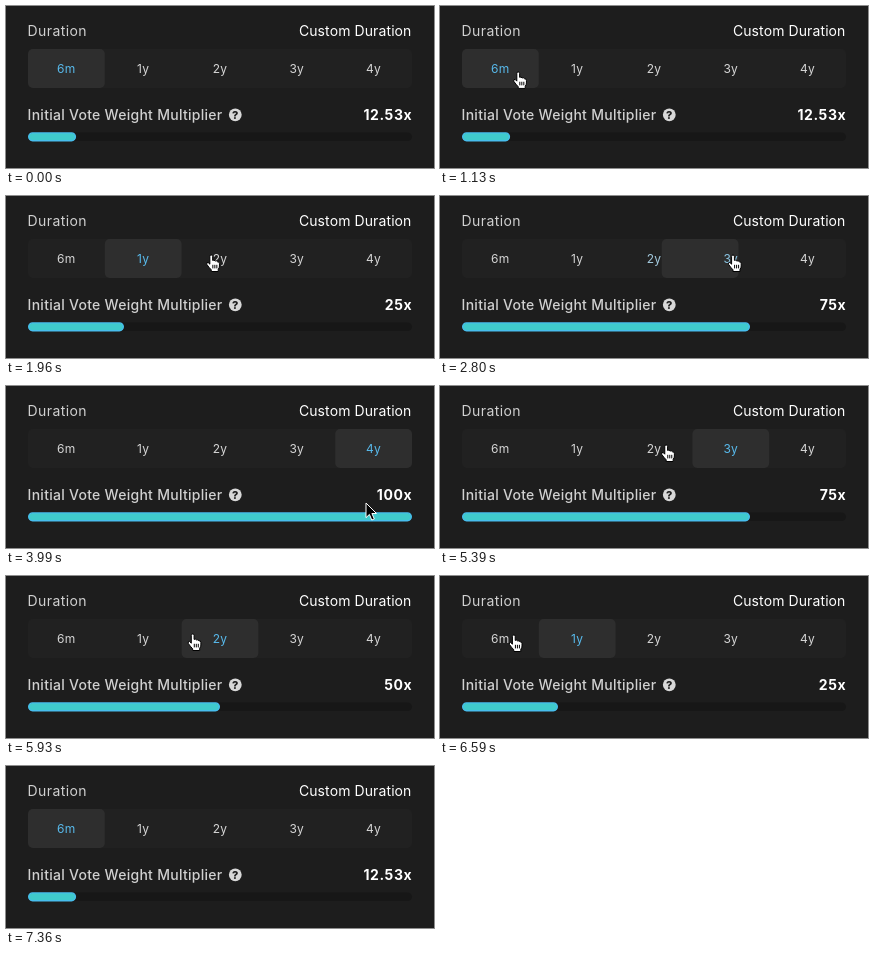
Write an HTML page that moves like this. It is 428 by 162 pixels and loops after 7.86 s.

```html
<!DOCTYPE html>
<html lang="en">
<head>
<meta charset="utf-8">
<title>Vote weight duration</title>
<style>
  html, body { margin: 0; width: 100%; height: 100%; overflow: hidden; background: #1d1d1d; }
  svg { display: block; width: 428px; height: 162px; }
  text { font-family: Inter, sans-serif; font-size: 14px; fill: #d0d0d0; letter-spacing: .4px; }
  .end { text-anchor: end; fill: #fff; letter-spacing: .1px; }
  .bold { font-weight: 700; letter-spacing: .6px; }
  .medium { font-weight: 500; letter-spacing: .27px; }
  .tab { font-size: 12px; text-anchor: middle; letter-spacing: .3px; }
  .help { font-size: 11px; font-weight: 800; text-anchor: middle; fill: #1d1d1d; letter-spacing: 0; }
</style>
</head>
<body>
<svg viewBox="0 0 428 162">
  <text x="21.6" y="30">Duration</text>
  <text class="end" x="405.5" y="30">Custom Duration</text>

  <rect x="22" y="43" width="384" height="39" rx="5" fill="#212121"/>
  <rect id="highlight" y="43" width="76.8" height="39" rx="5" fill="#2e2e2e"/>
  <g id="tabs"></g>

  <text class="medium" x="21.6" y="113.5">Initial Vote Weight Multiplier</text>
  <circle cx="229.3" cy="108.8" r="6.4" fill="#d8d8d8"/>
  <text class="help" x="229.3" y="112.8">?</text>
  <text id="value" class="end bold" x="406.3" y="113.5"></text>

  <rect x="22" y="126.5" width="384" height="8.5" rx="4.25" fill="#171717"/>
  <rect id="bar" x="22.7" y="126.9" height="7.8" rx="3.9" fill="#3fcacb" stroke="#47bdec" stroke-width="1.4"/>

  <path id="arrow" d="M0 0V14.6L3.4 11.4L5.8 17L8.3 15.9L5.9 10.5H10.5Z" fill="#000" stroke="#fff" stroke-linejoin="round"/>
  <g id="hand" stroke="#000" stroke-linejoin="round">
    <path d="M-1.6 1.4Q-1.6 0-.2 0Q1.2 0 1.2 1.4V5.4Q2.6 4.6 3.7 6Q5 5.2 6.1 6.8Q8 6.4 8 8.6V11Q8 13 6.8 14.2V16.5H-.2V14.8Q-2.6 12.4-4.6 9.4Q-5.2 7.2-3.4 7.4L-1.6 9.2Z" fill="#fff"/>
    <path d="M1.4 9.8V13.4M3.4 9.8V13.4M5.4 9.8V13.4"/>
  </g>
</svg>
<script>
const LOOP = 7860, SLIDE = 300, TAB_WIDTH = 76.8, LEFT = 22, RIGHT = 406;
const names = ['6m', '1y', '2y', '3y', '4y'];
const multipliers = [12.53, 25, 50, 75, 100];

const $ = id => document.getElementById(id);
const mix = (a, b, k) => a + (b - a) * k;
const tabCenter = n => LEFT + TAB_WIDTH * (n + .5);
const grey = [214, 214, 214], blue = [88, 186, 236];

// Four clicks going up the options, then four coming back down
const steps = [0, 1, 2, 3];
const upward = steps.map(n => ({ t: 1250 + 736 * n, option: n + 1 }));
const downward = steps.map(n => ({ t: 4800 + 640 * n, option: 3 - n }));
const clicks = [{ t: 0, option: 0 }, ...upward, ...downward];

const point = (t, x, y) => ({ t, x, y });
const over = offset => ({ t, option }) => point(t, tabCenter(option) + offset, 59);

const path = [
  point(170, 9, -18), point(450, 28, 42), point(730, 66, 68),
  point(1100, 66, 68), point(1130, 78, 66),
  ...upward.map(over(-6)),
  point(3520, 366, 69), point(3870, 366, 69),
  point(3990, 360, 117), point(4330, 415, 120), point(4660, 346, 69), point(4760, 316, 59),
  ...downward.map(over(8)), point(5930, 187, 58),
  point(7100, 66, 68), point(7350, -14, 34)
].sort((a, b) => a.t - b.t);

const labels = names.map((name, n) => {
  const label = document.createElementNS('http://www.w3.org/2000/svg', 'text');
  label.setAttribute('class', 'tab');
  label.setAttribute('x', tabCenter(n));
  label.setAttribute('y', 67);
  label.textContent = name;
  return $('tabs').appendChild(label);
});

const lastIndex = (list, t) => list.findLastIndex(item => item.t <= t);

// Slope for a smooth curve that never overshoots its points
function slope(i, axis) {
  if (i === 0 || i === path.length - 1) return 0;
  const [a, b, c] = path.slice(i - 1, i + 2);
  const before = (b[axis] - a[axis]) / (b.t - a.t);
  const after = (c[axis] - b[axis]) / (c.t - b.t);
  return before * after <= 0 ? 0 : 2 * before * after / (before + after);
}

function pointerAt(t, i, axis) {
  const a = path[i], b = path[i + 1], span = b.t - a.t, k = (t - a.t) / span;
  const ease = k * k * (3 - 2 * k);
  return mix(a[axis], b[axis], ease)
    + span * k * (1 - k) * ((1 - k) * slope(i, axis) - k * slope(i + 1, axis));
}

function drawPointer(t) {
  const i = lastIndex(path, t);
  const visible = i >= 0 && i < path.length - 1;
  const x = visible ? pointerAt(t, i, 'x') : 0;
  const y = visible ? pointerAt(t, i, 'y') : 0;
  const overTabs = x >= LEFT && x <= RIGHT && y >= 43 && y <= 82;
  for (const [id, shown] of [['hand', overTabs], ['arrow', !overTabs]]) {
    $(id).setAttribute('transform', `translate(${x} ${y})`);
    $(id).setAttribute('visibility', visible && shown ? 'visible' : 'hidden');
  }
}

function draw(t) {
  const i = lastIndex(clicks, t);
  const current = clicks[i].option;
  const previous = clicks[Math.max(0, i - 1)].option;
  const k = 1 - (1 - Math.min(1, (t - clicks[i].t) / SLIDE)) ** 3;

  $('highlight').setAttribute('x', LEFT + TAB_WIDTH * mix(previous, current, k));
  labels.forEach((label, n) => {
    const active = (n === current) * k + (n === previous) * (1 - k);
    label.style.fill = `rgb(${grey.map((c, j) => mix(c, blue[j], active))})`;
  });

  $('value').textContent = multipliers[current] + 'x';
  $('bar').setAttribute('width', (RIGHT - LEFT) * multipliers[current] / 100 - 1.4);
  drawPointer(t);
}

function frame() {
  draw(performance.now() % LOOP);
  requestAnimationFrame(frame);
}
frame();
</script>
</body>
</html>
```
